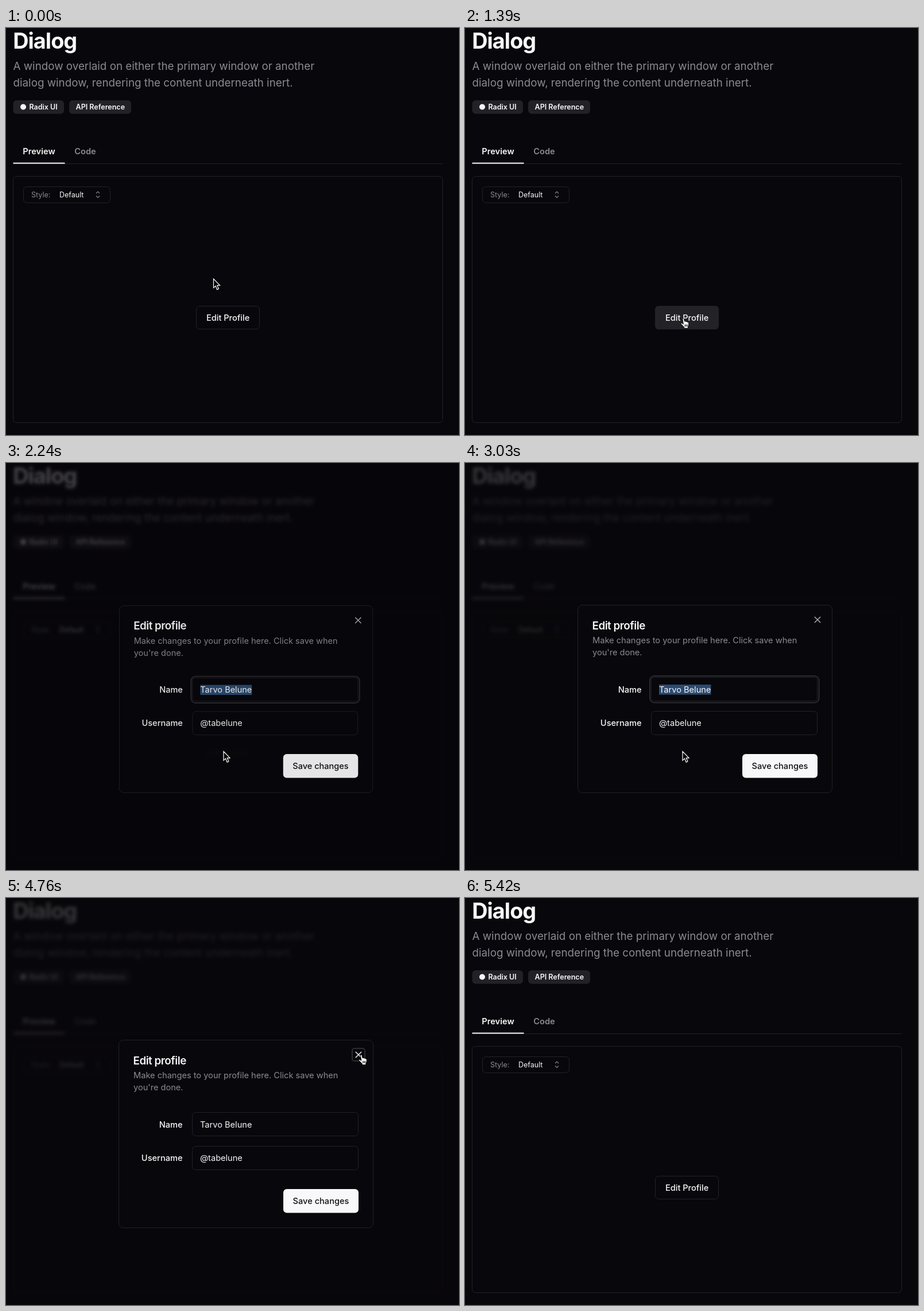
An HTML page for the animation above (5730 ms loop, 789 by 709 pixels).

```html
<!DOCTYPE html>
<html lang="en">
<head>
<meta charset="utf-8">
<title>Dialog</title>
<style>
  html, body { margin: 0; width: 100%; height: 100%; overflow: hidden; background: #08070b; }
  svg, #overlay { position: absolute; left: 0; top: 0; width: 789px; height: 709px; }
  #overlay { background: rgba(8, 7, 11, .8); backdrop-filter: blur(3px); }
  text { font: 400 14.6px Inter, sans-serif; font-optical-sizing: none; fill: #f8f7f9; white-space: pre; }
  .medium { font-weight: 500; }
  .semi { font-weight: 600; }
  .small { font-size: 12.5px; }
  .lead { font-size: 18.8px; }
  .muted { fill: #8b8a92; }
  .middle { text-anchor: middle; }
  .end { text-anchor: end; }
  .box { fill: none; stroke: #232227; }
  .badge { fill: #222125; }
  .ring { fill: none; stroke: #2c2b30; stroke-width: 2; }
</style>
</head>
<body>
<svg viewBox="0 0 789 709">
  <text x="12.2" y="36" style="font-size:37.8px;font-weight:700;letter-spacing:-.025em">Dialog</text>
  <text class="lead muted" x="12.5" y="72.5">A window overlaid on either the primary window or another</text>
  <text class="lead muted" x="12.5" y="102">dialog window, rendering the content underneath inert.</text>

  <rect class="badge" x="12.5" y="126" width="88.5" height="23.5" rx="6"/>
  <circle cx="30" cy="137.5" r="5" fill="#f8f7f9"/>
  <text class="small semi" x="40.5" y="142">Radix UI</text>
  <rect class="badge" x="110" y="126" width="108" height="23.5" rx="6"/>
  <text class="small semi middle" x="164.3" y="142">API Reference</text>

  <text class="semi middle" x="57.5" y="220">Preview</text>
  <text class="semi middle muted" x="138" y="220">Code</text>
  <path class="box" d="M12.5 236.5H761"/>
  <path d="M12.5 235.5H102.5" stroke="#f8f7f9" stroke-width="2"/>

  <rect class="box" x="12.5" y="258.5" width="748" height="429" rx="6"/>
  <rect class="box" x="30.5" y="276.5" width="151" height="28" rx="6"/>
  <text class="small muted" x="44" y="294.5">Style:</text>
  <text class="small" x="93" y="294.5">Default</text>
  <path d="M157 288l3-3 3 3M157 292.5l3 3 3-3" fill="none" stroke="#8b8a92" stroke-width="1.1"/>

  <rect class="box" x="331.5" y="484.5" width="110" height="40" rx="6"/>
  <rect id="editHover" x="331" y="484" width="111" height="41" rx="6" fill="#232226"/>
  <text class="medium middle" x="386.6" y="509.8">Edit Profile</text>
</svg>

<div id="overlay"></div>

<svg viewBox="0 0 789 709">
  <g id="dialog">
    <rect x="196.5" y="247.5" width="443" height="327" rx="8" fill="#08070b" stroke="#232227"/>
    <text class="semi" x="221.5" y="289.5" style="font-size:18.8px;letter-spacing:-.025em">Edit profile</text>
    <text class="muted" x="222" y="314">Make changes to your profile here. Click save when</text>
    <text class="muted" x="222" y="334.8">you're done.</text>

    <rect id="closeRing" class="ring" x="603" y="262" width="22" height="22" rx="4"/>
    <path id="close" d="M609.2 268.2l9.6 9.6m0-9.6l-9.6 9.6" stroke="#f8f7f9" stroke-width="1.4" stroke-linecap="round"/>

    <text class="medium end" x="307.5" y="399.5">Name</text>
    <rect id="inputRing" class="ring" x="322" y="371" width="294.5" height="46.5" rx="8"/>
    <rect class="box" x="324.5" y="373.5" width="289" height="41" rx="6"/>
    <rect id="selection" x="338" y="386" height="17.5" fill="#2b4a6f"/>
    <text id="name" x="338" y="399.5">Tarvo Belune</text>

    <text class="medium end" x="307.5" y="458">Username</text>
    <rect class="box" x="324.5" y="432.5" width="289" height="41" rx="6"/>
    <text x="338" y="458">@tabelune</text>

    <rect x="483" y="507" width="131" height="41.5" rx="6" fill="#f8f7f9"/>
    <rect id="saveHover" x="483" y="507" width="131" height="41.5" rx="6" fill="#dddce0"/>
    <text class="medium middle" x="548.5" y="533" style="fill:#111014">Save changes</text>
  </g>
  <g id="cursor">
    <path id="arrow" d="M0 0V15.6L3.5 12.3 6.1 18.6 8.9 17.4 6.3 11.3H11Z" fill="#000" stroke="#fff" stroke-width="1.2"/>
    <g id="hand" transform="translate(-3 2.8) scale(1.1)" stroke="#000" stroke-width=".9">
      <path d="M2.6 1.6C2.5 0 4.6-.2 5 1.3L6 5.5C7.2 4.7 8 5.1 8.3 5.9 9.3 5.3 10.3 5.8 10.5 6.6 11.8 6.1 12.5 6.9 12.5 8 12.5 11 12.2 12 11.3 13.6V16.2H5.2V14.6C3.6 12.8 2 11 .4 9.6-.6 8.6.7 7.4 1.9 8.1L3.9 9.5Z" fill="#fff"/>
      <path d="M6.5 10v3.6M8.3 10v3.6M10.1 10v3.6"/>
    </g>
  </g>
</svg>

<script>
const LOOP = 5730;
const el = id => document.getElementById(id);
const clamp = u => Math.min(1, Math.max(0, u));
const smooth = u => u * u * (3 - 2 * u);
const show = (id, opacity) => { el(id).style.opacity = opacity; };

// The CSS "ease" curve, cubic-bezier(.25, .1, .25, 1)
function ease(x) {
  let low = 0, high = 1;
  const bezier = (s, a, b) => 3 * s * (1 - s) ** 2 * a + 3 * s * s * (1 - s) * b + s ** 3;
  for (let i = 0; i < 16; i++) {
    const mid = (low + high) / 2;
    if (bezier(mid, .25, .25) < x) low = mid; else high = mid;
  }
  return bezier(high, .1, 1);
}

// Smoothed values at time t on a list of [time, ...values]
function track(t, keys) {
  const next = keys.findIndex(key => key[0] > t);
  if (next < 0) return keys[keys.length - 1].slice(1);
  if (next === 0) return keys[0].slice(1);
  const a = keys[next - 1], b = keys[next];
  const u = smooth((t - a[0]) / (b[0] - a[0]));
  return a.slice(1).map((v, i) => v + (b[i + 1] - v) * u);
}

const pointer = [
  [140, 361.5, 437], [390, 404, 505.5], [580, 404, 505.5], [1000, 372, 502],
  [1230, 372, 502], [1390, 379, 502.5], [3030, 379, 502.5], [3360, 547.5, 524],
  [4000, 547.5, 524], [4300, 641, 290], [4450, 617, 271], [4490, 617, 271],
  [4550, 617.5, 270], [4840, 617.5, 270], [5150, 183, 50], [5345, 183, 50], [5390, 192, 25.5]
];

const openness = t => t < 4840
  ? ease(clamp((t - 2107) / 200))
  : 1 - ease(clamp((t - 4840) / 200));

function draw(t) {
  const open = openness(t);
  show('overlay', open);
  show('dialog', open);
  const scale = .95 + .05 * open, drop = 6.5 * (1 - open);
  el('dialog').setAttribute('transform', `translate(418 ${411 + drop}) scale(${scale}) translate(-418 -411)`);

  show('editHover', track(t, [[570, 0], [720, 1], [2107, 1], [2257, 0]]));
  show('saveHover', track(t, [[3250, 0], [3400, 1], [4060, 1], [4210, 0]]));
  show('inputRing', track(t, [[3430, 1], [3580, 0]]));
  show('selection', t < 3420 ? 1 : 0);
  show('close', track(t, [[4400, .7], [4550, 1]]));
  show('closeRing', t < 4760 ? 0 : 1);

  const [x, y] = track(t, pointer);
  const inside = (x0, y0, x1, y1) => x > x0 && x < x1 && y > y0 && y < y1;
  const onButton = t < 1880 ? t >= 580 : open > .5 && (inside(483, 507, 614, 549) || inside(602, 261, 626, 285));
  show('hand', onButton ? 1 : 0);
  show('arrow', onButton ? 0 : 1);
  show('cursor', t < 5420 ? 1 : 0);
  el('cursor').setAttribute('transform', `translate(${x} ${y})`);
}

function frame() {
  el('selection').setAttribute('width', el('name').getComputedTextLength());
  draw(performance.now() % LOOP);
  requestAnimationFrame(frame);
}
frame();
</script>
</body>
</html>
```
